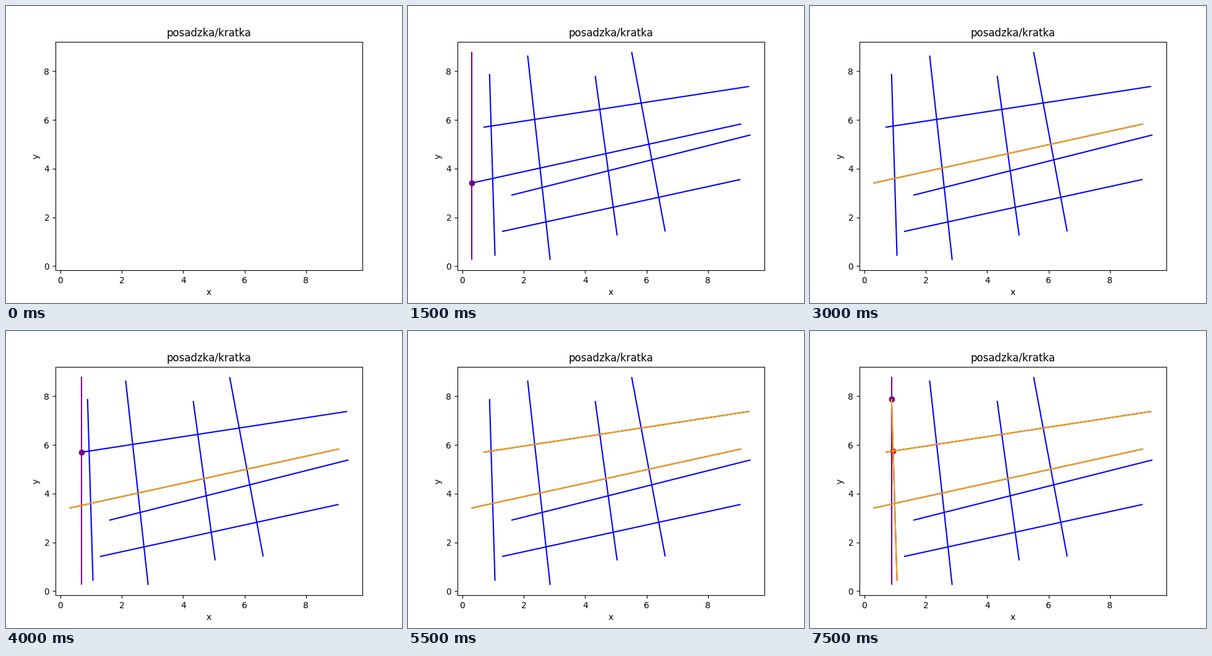
A matplotlib script for the animation above (8000 ms loop, 640 by 480 pixels).

```python
from itertools import islice

import numpy as np
import matplotlib.pyplot as plt
from matplotlib.animation import FuncAnimation
from matplotlib.collections import LineCollection

# Key endpoints of the floor grid: (x0, y0) -> (x1, y1)
ROWS = [((0.300, 3.406), (9.077, 5.832)), ((0.692, 5.697), (9.338, 7.371)),
        ((1.598, 2.909), (9.380, 5.381)), ((1.296, 1.421), (9.059, 3.556))]
COLUMNS = [((0.889, 7.883), (1.066, 0.424)), ((2.129, 8.640), (2.862, 0.254)),
           ((4.328, 7.802), (5.041, 1.259)), ((5.514, 8.782), (6.604, 1.421))]
GRID = np.array(ROWS + COLUMNS)
FRAMES = 16

low, high = GRID.min(axis=(0, 1)), GRID.max(axis=(0, 1))
pad = 0.05 * (high - low)


def height(seg, x):
    """y of a segment at the sweep position."""
    (x0, y0), (x1, y1) = seg
    return y0 + (y1 - y0) * (x - x0) / (x1 - x0)


def crossing(s, t):
    """Point shared by two segments, or None."""
    d, e = s[1] - s[0], t[1] - t[0]
    k, m = np.linalg.solve(np.column_stack([d, -e]), t[0] - s[0])
    return s[0] + k * d if 0 <= k <= 1 and 0 <= m <= 1 else None


def neighbours(seg, active):
    """Active segments just below and just above the start of seg."""
    x, y = seg[0]
    ordered = sorted(active, key=lambda s: height(s, x))
    below = [s for s in ordered if height(s, x) < y]
    above = [s for s in ordered if height(s, x) >= y]
    return below[-1:] + above[:1]


def scene(grid=GRID, sweep=None, active=(), start=None, hits=()):
    line = [] if sweep is None else [[(sweep, low[1]), (sweep, high[1])]]
    dots = [] if start is None else [(start, "purple")]
    dots += [(p, "red") for p in hits]
    return grid, line, list(active), dots


def sweep_scenes():
    """Sweep from left to right, one scene for every visible step."""
    yield scene(grid=[])
    yield scene()
    active, hits = [], []
    for seg in sorted(GRID, key=lambda s: s[0, 0]):
        start, x = seg[0], seg[0, 0]
        yield scene(sweep=x, active=active, hits=hits)
        yield scene(sweep=x, active=active, start=start, hits=hits)
        near = neighbours(seg, active)
        active.append(seg)
        yield scene(sweep=x, active=active, start=start, hits=hits)
        for other in near:
            point = crossing(seg, other)
            if point is not None:
                hits.append(point)
                yield scene(sweep=x, active=active, start=start, hits=hits)
        yield scene(sweep=x, active=active, hits=hits)
        yield scene(active=active, hits=hits)


SCENES = list(islice(sweep_scenes(), FRAMES))

fig, ax = plt.subplots(figsize=(6.4, 4.8), dpi=100)
ax.set_title("posadzka/kratka")
ax.set_xlabel("x")
ax.set_ylabel("y")
ax.set_xlim(low[0] - pad[0], high[0] + pad[0])
ax.set_ylim(low[1] - pad[1], high[1] + pad[1])

layers = [ax.add_collection(LineCollection([], colors=c, linewidths=1.5, zorder=z))
          for z, c in enumerate(("blue", "purple", "orange"), start=2)]
dots = []


def update(frame):
    *lines, points = SCENES[frame]
    for layer, segments in zip(layers, lines):
        layer.set_segments(segments)
    while dots:
        dots.pop().remove()
    for xy, color in points:
        dots.append(ax.scatter(*xy, color=color, zorder=1))
    return layers + dots


anim = FuncAnimation(fig, update, frames=FRAMES, interval=500,
                     repeat=True, repeat_delay=0, blit=False)
plt.show()
```
